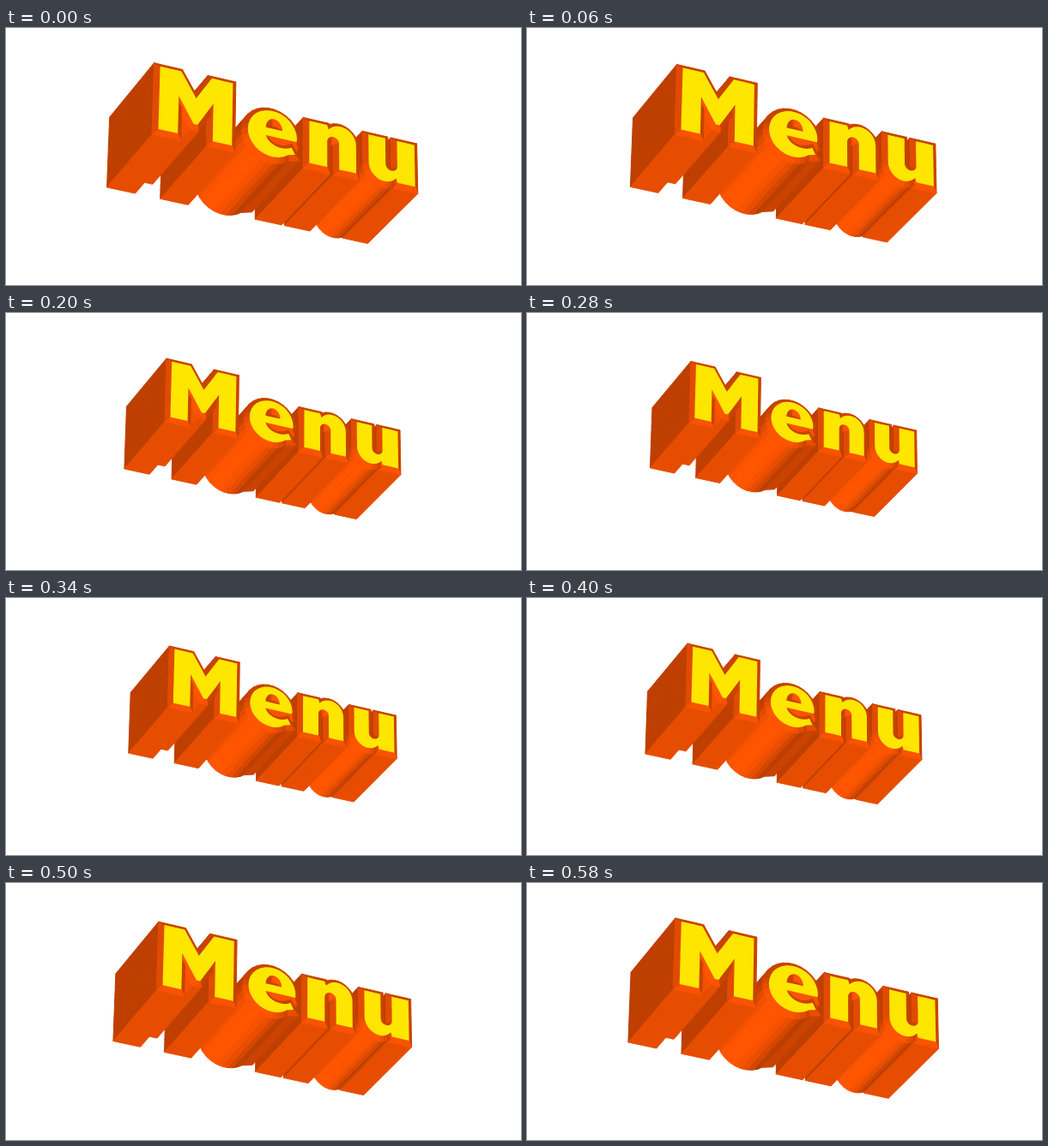
An HTML page with a canvas for the animation above (600 ms loop, 600 by 300 pixels).

```html
<!DOCTYPE html>
<html lang="en">
<head>
<meta charset="utf-8">
<title>Menu</title>
<style>
  html, body { margin: 0; width: 100%; height: 100%; overflow: hidden; background: #fff; }
  canvas { display: block; }
</style>
</head>
<body>
<canvas id="stage" width="600" height="300" role="img" aria-label="Menu"></canvas>
<script>
const ctx = document.getElementById('stage').getContext('2d');
const LOOP = 600, STEP = 20;
const DEPTH = 130, INSET = 6, RAISE = 4.5, FOCAL = 3700;
const BASE = 6, X_HEIGHT = 65, CAP = 93, STEM = 24;

function arc(cx, cy, rx, ry, from, to) {
  const count = Math.ceil(Math.abs(to - from) / 12);
  return Array.from({ length: count + 1 }, (_, i) => {
    const angle = (from + (to - from) * i / count) * Math.PI / 180;
    return [cx + rx * Math.cos(angle), cy + ry * Math.sin(angle)];
  });
}

// Letter outlines run clockwise, holes counter-clockwise, y points up.
function letterM(center, half) {
  const inner = half - STEM - 1;
  const right = [
    [0, 60], [20, CAP], [half, CAP], [half, BASE], [inner, BASE], [inner, 58], [2.5, 24]
  ];
  const left = right.slice(1).reverse().map(([x, y]) => [-x, y]);
  return [...right, ...left].map(([x, y]) => [center + x, y]);
}

function letterE(x, y) {
  return [
    [[x + 32, y - 4], ...arc(x + 12, y - 1, 21, 16, 190, 310), [x + 30, y - 22],
      ...arc(x, y, 32.5, 32, -50, -360)],
    arc(x + 2, y + 7, 11, 14, 0, 180)
  ];
}

function letterN(left, right) {
  const stem = left + STEM, inner = right - STEM + 1, gap = (inner - stem) / 2;
  return [
    [left, BASE], [left, X_HEIGHT], [stem, X_HEIGHT],
    ...arc(right - 21, 45, 21, 22, 140, 0),
    [right, BASE], [inner, BASE],
    ...arc(stem + gap, 42, gap, gap, 0, 180),
    [stem, BASE]
  ];
}

const n = letterN(203, 266);
const u = n.map(([x, y]) => [549 - x, BASE + X_HEIGHT - y]);
const outlines = [letterM(53.5, 47.5), ...letterE(154, 35), n, u];

// Splits long edges so that the walls can be sorted by distance.
function split(points) {
  return points.flatMap(([x, y], i) => {
    const [ex, ey] = points[(i + 1) % points.length];
    const count = Math.ceil(Math.hypot(ex - x, ey - y) / 14);
    return Array.from({ length: count }, (_, k) =>
      [x + (ex - x) * k / count, y + (ey - y) * k / count]);
  });
}

function normals(points) {
  return points.map(([x, y], i) => {
    const [nx, ny] = points[(i + 1) % points.length];
    const len = Math.hypot(nx - x, ny - y);
    return [(y - ny) / len, (nx - x) / len];
  });
}

function grow(points, sides) {
  return points.map(([x, y], i) => {
    const [ax, ay] = sides.at(i - 1), [bx, by] = sides[i];
    const k = INSET / Math.max(0.5, 1 + ax * bx + ay * by);
    return [x + (ax + bx) * k, y + (ay + by) * k];
  });
}

function shade(value, min) {
  const red = Math.round(Math.max(min, Math.min(255, value)));
  return `rgb(${red},${Math.round(red / 3)},0)`;
}

const faces = outlines.map(split);
const walls = [], bevels = [];
for (const face of faces) {
  const sides = normals(face), rim = grow(face, sides);
  face.forEach((a, i) => {
    const j = (i + 1) % face.length, b = face[j], p = rim[i], q = rim[j];
    const [nx, ny] = sides[i], light = -89 * nx - 129 * ny;
    if (0.39 * nx + 0.517 * ny < 0) {
      walls.push({
        far: 0.39 * (p[0] + q[0]) + 0.517 * (p[1] + q[1]),
        color: shade(101 + light, 188),
        corners: [[...p, 0], [...q, 0], [...q, DEPTH], [...p, DEPTH]]
      });
    }
    bevels.push({
      color: shade(172 + 0.6 * light, 200),
      corners: [[...p, 0], [...q, 0], [...b, -RAISE], [...a, -RAISE]]
    });
  });
}
walls.sort((a, b) => b.far - a.far);

function trace(points, push) {
  points.forEach(([u, v, d], i) => {
    const w = 1 + push + (0.39 * u + 0.517 * v + 0.762 * d) / FOCAL;
    const x = 300 + (-130 + 0.899 * u + 0.008 * v - 0.441 * d) / w;
    const y = 150 + (-26 + 0.202 * u - 0.856 * v + 0.484 * d) / w;
    if (i) ctx.lineTo(x, y); else ctx.moveTo(x, y);
  });
  ctx.closePath();
}

function draw() {
  const time = Math.floor(performance.now() % LOOP / STEP) * STEP;
  const push = 0.086 * (1 - Math.cos(2 * Math.PI * time / LOOP));
  ctx.fillStyle = '#fff';
  ctx.fillRect(0, 0, 600, 300);
  ctx.lineWidth = 1;
  ctx.lineJoin = 'round';
  for (const { color, corners } of [...walls, ...bevels]) {
    ctx.fillStyle = ctx.strokeStyle = color;
    ctx.beginPath();
    trace(corners, push);
    ctx.fill();
    ctx.stroke();
  }
  ctx.fillStyle = '#ffe600';
  ctx.beginPath();
  for (const face of faces) trace(face.map(p => [...p, -RAISE]), push);
  ctx.fill();
  requestAnimationFrame(draw);
}
draw();
</script>
</body>
</html>
```
